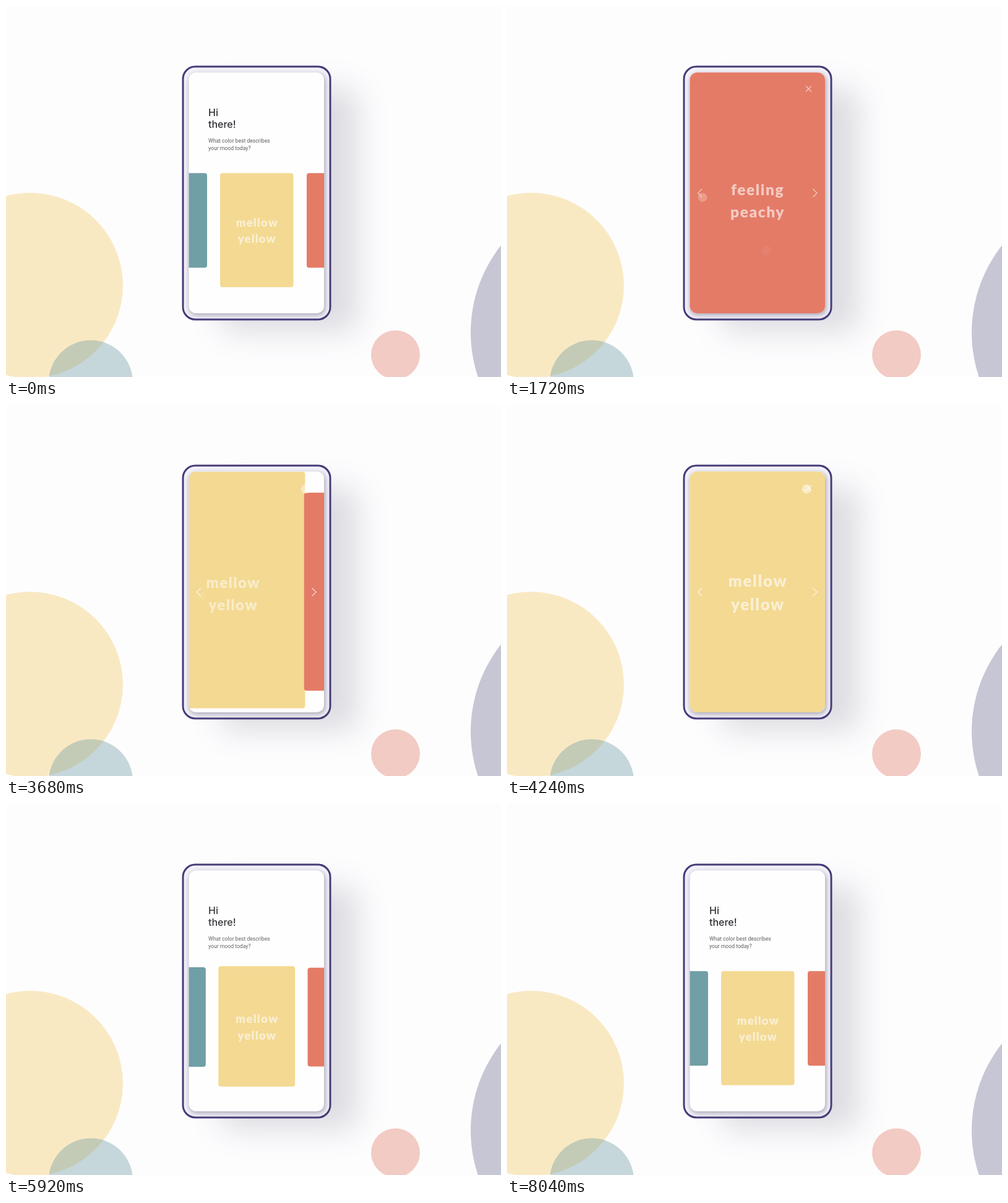
An HTML page that plays this animation: 800x600 px, repeating every 8.08 s.

```html
<!DOCTYPE html>
<html lang="en">
<head>
<meta charset="utf-8">
<title>Mood colors</title>
<style>
  html, body { margin: 0; width: 100%; height: 100%; overflow: hidden; background: #fefdfe; }
  svg { display: block; width: 100vw; height: 100vh; }
  .title { font: 500 16px Inter, sans-serif; fill: #2f2e33; }
  .copy { font: 400 8.65px Roboto, sans-serif; fill: #5d5c62; }
  .mood { font: 900 18.5px Lato, sans-serif; letter-spacing: 1.2px; text-anchor: middle; fill: #fff; }
  .icon { fill: none; stroke: #fff; stroke-width: 1.2; stroke-opacity: .75; }
</style>
</head>
<body>
<svg viewBox="0 0 800 600">
  <defs>
    <clipPath id="screen"><rect x="295.5" y="107.5" width="218.5" height="389.5" rx="12"/></clipPath>
    <clipPath id="bezel"><rect x="286" y="98" width="238" height="409" rx="20"/></clipPath>
    <filter id="far" x="-50%" y="-50%" width="200%" height="200%"><feGaussianBlur stdDeviation="25"/></filter>
    <filter id="near" x="-20%" y="-20%" width="140%" height="140%"><feGaussianBlur stdDeviation="4.5"/></filter>
  </defs>
  <rect width="800" height="600" fill="#fefdfe"/>
  <rect x="345" y="132" width="225" height="396" rx="20" fill="#4a4860" opacity=".18" filter="url(#far)"/>
  <circle cx="39" cy="452" r="150" fill="#f9e9c3"/>
  <circle cx="137" cy="608.5" r="68" fill="#709fa6" opacity=".4"/>
  <circle cx="629.5" cy="564" r="39.5" fill="#f2cbc4"/>
  <circle cx="978" cy="528" r="227" fill="#c7c6d5"/>
  <g clip-path="url(#bezel)">
    <rect x="286" y="98" width="238" height="409" fill="#f4f2fa"/>
    <rect x="296" y="110" width="220" height="390" rx="12" fill="#3f3c58" opacity=".42" filter="url(#near)"/>
  </g>
  <rect x="286" y="98" width="238" height="409" rx="20" fill="none" stroke="#463b78" stroke-width="3"/>
  <g clip-path="url(#screen)">
    <rect x="295" y="107" width="220" height="391" fill="#fffefe"/>
    <g id="intro">
      <text class="title" x="327" y="178">Hi</text>
      <text class="title" x="327" y="197">there!</text>
      <text class="copy" x="327" y="220.5">What color best describes</text>
      <text class="copy" x="327" y="233">your mood today?</text>
    </g>
    <g id="cards"></g>
    <g id="dots" fill="#fff"></g>
    <g id="icons" class="icon">
      <path d="M483 129.500l9 9m0-9l-9 9"/>
      <path d="M315 296l-6.500 6.500 6.500 6.500"/>
      <path d="M494.500 296l6.500 6.500-6.500 6.500"/>
    </g>
  </g>
</svg>
<script>
const LOOP = 8080, DURATION = 800;
const $ = id => document.getElementById(id);

function add(parent, tag, attrs, text = '') {
  const el = document.createElementNS('http://www.w3.org/2000/svg', tag);
  set(el, attrs);
  el.textContent = text;
  return parent.appendChild(el);
}
function set(el, attrs) {
  for (const key in attrs) el.setAttribute(key, attrs[key]);
}

const cards = [
  { fill: '#709fa6', words: [] },
  { fill: '#f3d992', words: ['mellow', 'yellow'] },
  { fill: '#e47b67', words: ['feeling', 'peachy'] },
  { fill: '#6b62a2', words: [] }
].map(({ fill, words }) => ({
  box: add($('cards'), 'rect', { fill, rx: 4 }),
  lines: words.map(word => add($('cards'), 'text', { class: 'mood' }, word))
}));

// A pose is [x, y, width, height, text x, baseline 1, baseline 2, text scale, text opacity]
function carousel(active, left) {
  return cards.map((_, i) => {
    const d = i - active;
    const w = d ? 98 : 118.5, h = d ? 153 : 184.5, y = 270.3;
    const x = d < 0 ? left - 119 + 119 * (d + 1) : d ? left + 140 + 119 * (d - 1) : left;
    return [x, y, w, h, x + w / 2 + .6, y + .47 * h, y + .611 * h, d ? .83 : 1, d ? 0 : .6];
  });
}
const hidden = (x, w = 150) => [x, 140, w, 320, x, 300, 330, 1, 0];

const scenes = [
  { cards: carousel(1, 346), full: 0 },
  { cards: carousel(2, 343.5), full: 0, dot: [419, 395, .27] },
  {
    cards: [
      hidden(-130),
      [40, 124, 240, 313, 155, 309, 329, .65, 0],
      [283, 60, 244, 485, 405.5, 294, 332, 1.4, .6],
      hidden(760)
    ],
    full: 1, dot: [316, 309.5, .3]
  },
  {
    cards: [
      hidden(130),
      [290, 105, 230, 395, 405.5, 294, 332, 1.4, .6],
      [517.5, 156.5, 202, 290.5, 618, 294, 332, 1.2, 0],
      hidden(760)
    ],
    full: 1, dot: [484, 136, .48]
  }
];

// Each step leads to the next scene; higher power means a sharper ease-out
const steps = [
  { at: 40, power: 6.5 },
  { at: 1600, power: 10 },
  { at: 3480, power: 6.5 },
  { at: 5640, power: 7 }
];

const dots = scenes.map(({ dot }) =>
  dot && add($('dots'), 'circle', { cx: dot[0], cy: dot[1], r: 7.3 }));

const mix = (a, b, p) => a + (b - a) * p;

function draw(t) {
  let from = 0, to = 0, p = 0;
  steps.forEach(({ at, power }, i) => {
    if (t < at) return;
    from = i;
    to = (i + 1) % scenes.length;
    p = 1 - (1 - Math.min(1, (t - at) / DURATION)) ** power;
  });
  const a = scenes[from], b = scenes[to];

  cards.forEach(({ box, lines }, i) => {
    const [x, y, width, height, cx, y1, y2, scale, opacity] =
      a.cards[i].map((v, k) => mix(v, b.cards[i][k], p));
    set(box, { x, y, width, height });
    lines.forEach((line, k) => set(line, {
      transform: `translate(${cx} ${k ? y2 : y1}) scale(${scale})`, opacity
    }));
  });

  dots.forEach((dot, i) => {
    if (!dot) return;
    const share = (i === from ? 1 - p : 0) + (i === to ? p : 0);
    set(dot, { opacity: share * scenes[i].dot[2] });
  });

  const full = mix(a.full, b.full, p);
  set($('icons'), { opacity: full });
  set($('intro'), { opacity: 1 - full });
}

const start = performance.now();
function tick() {
  draw((performance.now() - start) % LOOP);
  requestAnimationFrame(tick);
}
draw(0);
tick();
</script>
</body>
</html>
```
